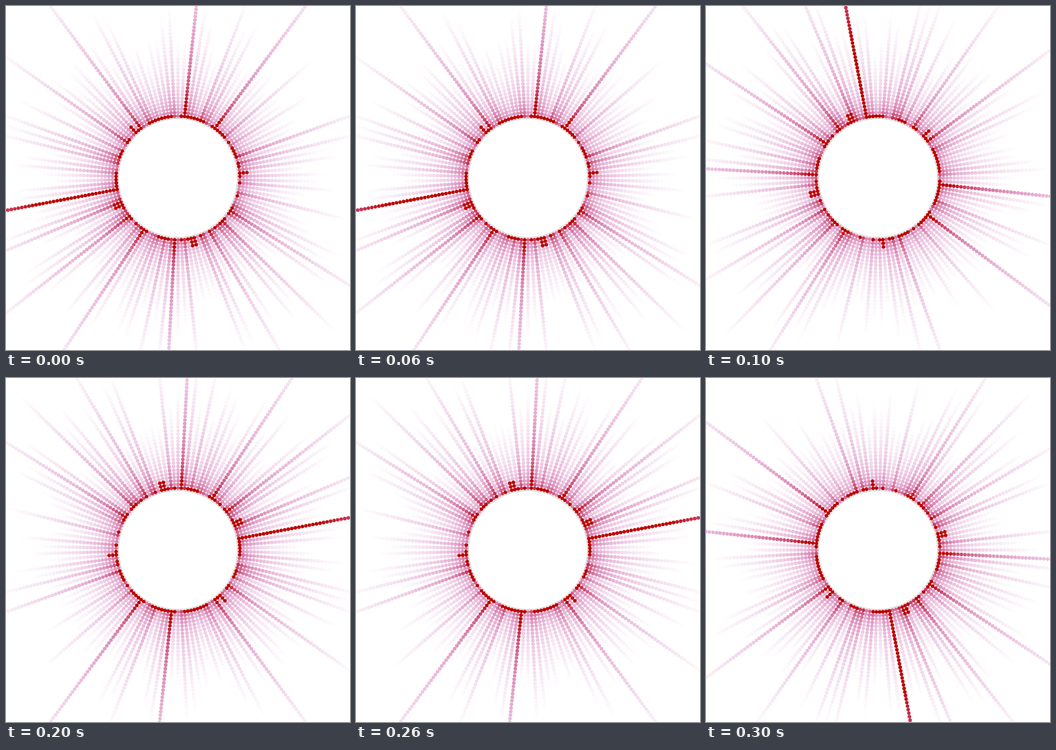
These frames come from a looping animation (500x500 px, 400 ms). An HTML page with a canvas:

```html
<!DOCTYPE html>
<html lang="en">
<head>
<meta charset="utf-8">
<title>Radial burst</title>
<style>
  html, body { margin: 0; width: 100%; height: 100%; overflow: hidden; background: #fff; }
  canvas {
    display: block;
    width: 500px;
    height: 500px;
    animation: turn 400ms steps(4, end) infinite;
  }
  @keyframes turn { to { transform: rotate(360deg); } }
</style>
</head>
<body>
<canvas id="burst" width="500" height="500"></canvas>
<script>
const RAYS = 118, INNER = 90, SPACING = 5.22, DOT = 2.6, REACH = 70;

// The few leading rays: index -> strength. All others are seeded random.
const leaders = {
  2: 5.5, 12: 4, 23: 1.7, 40: 2.3, 44: 2, 49: 1.9,
  60: 4, 70: 3.2, 76: 2.8, 81: 2.2, 85: 35, 100: 2, 106: 2.7
};

// Colour ramp: level, red, green, blue.
const ramp = [
  [0.016, 255, 255, 255],
  [0.04, 243, 220, 238],
  [0.1, 232, 182, 216],
  [0.22, 219, 138, 183],
  [0.5, 203, 72, 112],
  [1, 187, 0, 0]
];

function colour(level) {
  const v = Math.min(level, 1);
  const n = ramp.findIndex(stop => stop[0] >= v);
  const [a, b] = [ramp[n - 1], ramp[n]];
  const t = Math.log(v / a[0]) / Math.log(b[0] / a[0]);
  return `rgb(${[1, 2, 3].map(c => Math.round(a[c] + (b[c] - a[c]) * t))})`;
}

function random(seed) {
  const x = Math.sin(seed * 12.9898 + 4.1) * 43758.5453;
  return x - Math.floor(x);
}

function makeRay(index) {
  const strength = leaders[index] || 0.4 + 0.9 * random(index) ** 2;
  const lit = leaders[index] || random(index + 500) < 0.5;
  const tall = random(index + 900) < 0.1;
  return { angle: index / RAYS * 2 * Math.PI, strength, base: lit ? (tall ? 3 : 1) : 0 };
}

function levelAt(ray, k) {
  return k < ray.base ? 1 : ray.strength / (k + 2) * (1 - k / REACH);
}

const ctx = document.getElementById("burst").getContext("2d");

function disc(x, y, r) {
  ctx.beginPath();
  ctx.arc(x, y, r, 0, 2 * Math.PI);
}

const rays = Array.from({ length: RAYS }, (_, index) => makeRay(index));

ctx.translate(250, 250);
for (let k = REACH - 1; k >= 0; k--) {
  const r = INNER + k * SPACING;
  for (const ray of rays) {
    const level = levelAt(ray, k);
    if (level <= ramp[0][0]) continue;
    ctx.fillStyle = colour(level);
    disc(r * Math.sin(ray.angle), -r * Math.cos(ray.angle), DOT);
    ctx.fill();
  }
}
ctx.fillStyle = "#fff";
ctx.strokeStyle = "#c8c8c8";
disc(0, 0, 86.5);
ctx.fill();
ctx.stroke();
</script>
</body>
</html>
```
